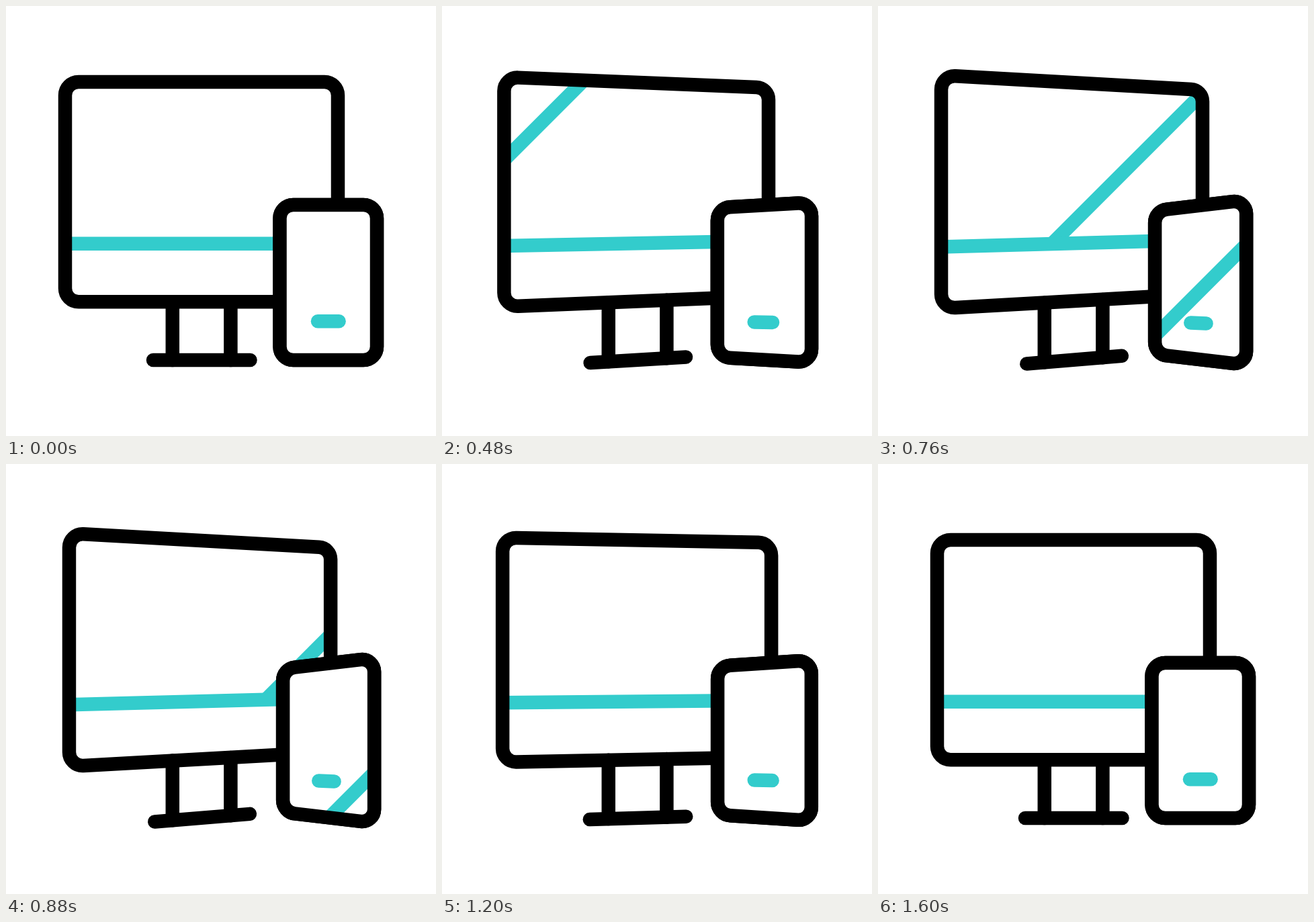
Recreate the animation shown at these times as an HTML page with a canvas. Size 640 by 640 pixels, loop 1760 ms.

```html
<!DOCTYPE html>
<html lang="en">
<head>
<meta charset="utf-8">
<title>Responsive devices</title>
<style>
  html, body { margin: 0; width: 100%; height: 100%; overflow: hidden; background: #fff; }
  canvas { display: block; width: 640px; height: 640px; }
</style>
</head>
<body>
<canvas id="stage"></canvas>
<script>
const LOOP = 1760, STEP = 40, SIZE = 640, LINE = 20.5, RADIUS = 20;
const BLACK = '#000', TEAL = '#33cccc', WHITE = '#fff';

const canvas = document.getElementById('stage');
const ctx = canvas.getContext('2d');
const dpr = window.devicePixelRatio || 1;
canvas.width = canvas.height = SIZE * dpr;

const smooth = (t, from, to) => {
  const p = Math.min(1, Math.max(0, (t - from) / (to - from)));
  return p * p * (3 - 2 * p);
};

// Fake perspective: squeeze x towards a pivot, taper heights across the width
const turner = (pivotX, pivotY, squeeze, taper, shift, k) => (x, y) => [
  x + k * (shift - squeeze * (x - pivotX)),
  y - k * taper * (x - pivotX) * (y - pivotY)
];

function line(a, b, color, cap = 'round') {
  ctx.beginPath();
  ctx.moveTo(...a);
  ctx.lineTo(...b);
  ctx.strokeStyle = color;
  ctx.lineCap = cap;
  ctx.lineWidth = LINE;
  ctx.stroke();
}

// Rounded outline through four corners, tighter on the right when turned
function frame(corners, k) {
  const [tl, , , bl] = corners;
  ctx.beginPath();
  ctx.moveTo(tl[0], (tl[1] + bl[1]) / 2);
  corners.forEach((p, i) => {
    const onRight = i === 1 || i === 2;
    ctx.arcTo(...p, ...corners[(i + 1) % 4], RADIUS - (onRight ? 2 * k : 0));
  });
  ctx.closePath();
  ctx.strokeStyle = BLACK;
  ctx.lineWidth = LINE;
  ctx.stroke();
}

// Diagonal gleam along x + y = sum, kept inside the given shape
function gleam(shape, sum) {
  ctx.save();
  ctx.beginPath();
  shape.forEach(p => ctx.lineTo(...p));
  ctx.clip();
  line([sum - SIZE, SIZE], [sum, 0], TEAL, 'butt');
  ctx.restore();
}

function drawMonitor(t) {
  const k = smooth(t, 100, 680) - smooth(t, 840, 1440);
  const screen = turner(272.5, 276.5, 0.042, 0.00033, -1.7, k);
  const stand = turner(287, 276.5, 0.02, 0.000325, 0.9, k);
  const left = 88, right = 494, top = 113, bottom = 440.3, band = 353.7, floor = 527;

  const tl = screen(left, top), tr = screen(right, top);
  const bandL = screen(left, band), bandR = screen(right, band);

  gleam([tl, tr, bandR, bandL], 488 + (t - 640) * 1.039);
  line(bandL, bandR, TEAL, 'butt');
  frame([tl, tr, screen(right, bottom), screen(left, bottom)], k);

  for (const x of [247.8, 334.4]) {
    line([x, screen(x, bottom)[1]], [x, stand(x, floor)[1]], BLACK);
  }
  line(stand(219, floor), stand(363.5, floor), BLACK);
}

function drawPhone(t) {
  const k = smooth(t, 180, 770) - smooth(t, 910, 1550);
  const turn = turner(486.2, 411.5, 0.059, -0.00095, 0, k);
  const left = 407.5, right = 552, top = 296, bottom = 527, button = 469.2;
  const corners = [turn(left, top), turn(right, top), turn(right, bottom), turn(left, bottom)];

  frame(corners, k);
  ctx.fillStyle = WHITE;
  ctx.fill();
  gleam(corners, 798.5 + (t - 640) * 0.87);
  line([464 + 1.3 * k, button + 2.4 * k], [495.6 - 7 * k, button + 3.3 * k], TEAL);
  frame(corners, k);
}

function draw(now) {
  const t = Math.floor((now % LOOP) / STEP) * STEP;
  ctx.setTransform(dpr, 0, 0, dpr, 0, 0);
  ctx.fillStyle = WHITE;
  ctx.fillRect(0, 0, SIZE, SIZE);
  drawMonitor(t);
  drawPhone(t);
}

const start = performance.now();
function tick() {
  draw(performance.now() - start);
  requestAnimationFrame(tick);
}
tick();
</script>
</body>
</html>
```
